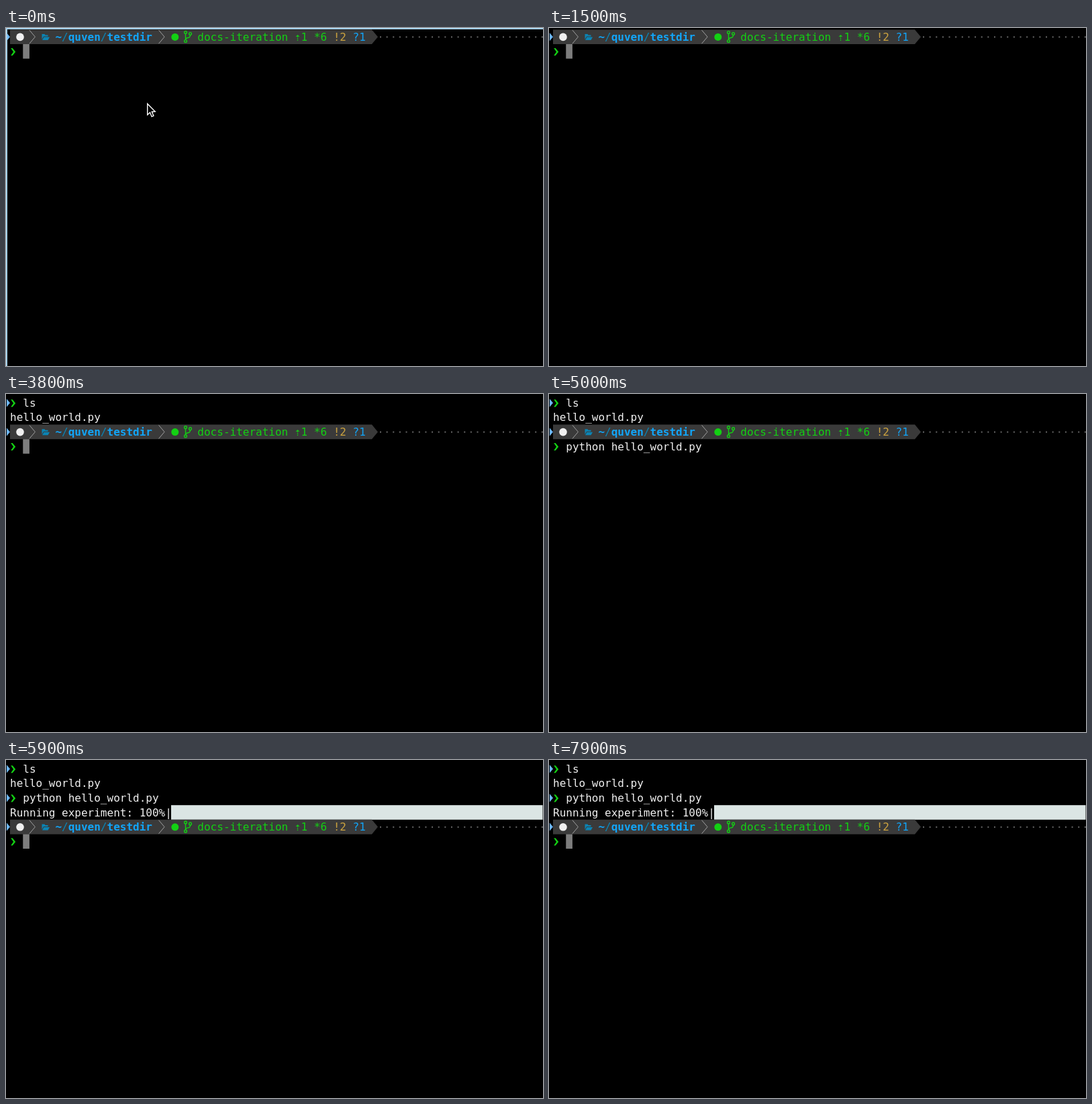
An HTML page with a canvas that plays this animation: 800 px wide and 503 px high, repeating every 8000 ms.

```html
<!DOCTYPE html>
<html lang="en">
<head>
<meta charset="utf-8">
<title>Terminal session</title>
<style>
  html, body { margin: 0; width: 100%; height: 100%; overflow: hidden; background: #000; }
  canvas { display: block; }
</style>
</head>
<body>
<canvas id="stage" width="800" height="503"></canvas>
<script>
const ctx = document.getElementById('stage').getContext('2d');
const LOOP = 8000, CELL = 9.633, LINE = 21.6, LEFT = 6;
const FONT = '16px "DejaVu Sans Mono", monospace';
const GREEN = '#13d013', BLUE = '#12a5f8', DIM_BLUE = '#0b84b4', WHITE = '#f0f0f0';
const FILE = 'hello_world.py';

const colX = col => LEFT + col * CELL;
const rowY = row => 2.4 + row * LINE;

function rect(x, y, w, h, color) {
  ctx.fillStyle = color;
  ctx.fillRect(x, y, w, h);
}

function poly(points, color) {
  ctx.beginPath();
  points.forEach(([x, y]) => ctx.lineTo(x, y));
  ctx.closePath();
  ctx.fillStyle = color;
  ctx.fill();
}

function disc(x, y, r, color) {
  ctx.beginPath();
  ctx.arc(x, y, r, 0, 7);
  ctx.fillStyle = color;
  ctx.fill();
}

function text(str, col, row, color = WHITE, bold = false) {
  ctx.font = (bold ? 'bold ' : '') + FONT;
  ctx.fillStyle = color;
  ctx.fillText(str, colX(col), rowY(row) + 16.4);
}

function cursor(col, row) {
  rect(colX(col), rowY(row), CELL, LINE, '#7d7d7d');
}

function marker(row) {
  const y = rowY(row) + 10.8;
  poly([[1, y - 6], [6, y], [1, y + 6]], '#6cb6f6');
}

function prompt(row, command = '') {
  const y = rowY(row) + 11.4;
  poly([[7.2, y - 5.5], [9.8, y - 5.5], [14.2, y], [9.8, y + 5.5], [7.2, y + 5.5], [11, y]], GREEN);
  text(command, 2, row);
}

function ran(row, command) {
  marker(row);
  prompt(row, command);
}

function folder(x, y) {
  poly([[x, y + 8], [x, y], [x + 4, y], [x + 5, y + 1.5], [x + 9, y + 1.5], [x + 9, y + 3.5],
        [x + 2.5, y + 3.5]], DIM_BLUE);
  poly([[x + 3, y + 4.5], [x + 11.5, y + 4.5], [x + 9, y + 9], [x + 0.5, y + 9]], DIM_BLUE);
}

function branch(x, y) {
  ctx.strokeStyle = GREEN;
  ctx.lineWidth = 1.4;
  ctx.beginPath();
  ctx.moveTo(x, y + 5);
  ctx.lineTo(x, y + 14);
  ctx.moveTo(x + 7, y + 7);
  ctx.quadraticCurveTo(x + 7, y + 10.5, x + 3.5, y + 11);
  ctx.quadraticCurveTo(x, y + 11.5, x, y + 14);
  ctx.stroke();
  for (const [dx, dy] of [[0, 3], [7, 5], [0, 16]]) {
    ctx.beginPath();
    ctx.arc(x + dx, y + dy, 1.9, 0, 7);
    ctx.stroke();
  }
}

function separator(col, row) {
  const x = colX(col), y = rowY(row);
  ctx.strokeStyle = '#a0a0a0';
  ctx.lineWidth = 1;
  ctx.beginPath();
  ctx.moveTo(x, y + 0.8);
  ctx.lineTo(x + 8.5, y + 10.8);
  ctx.lineTo(x, y + 20.8);
  ctx.stroke();
}

// Two-line prompt: the status bar, then the input line
function statusBar(row) {
  const y = rowY(row), end = 545;
  poly([[LEFT, y], [end, y], [end + 9, y + LINE / 2], [end, y + LINE], [LEFT, y + LINE]], '#3a3a3a');
  for (let x = 557; x < 800; x += CELL) rect(x, y + 10.1, 2, 1.8, '#707070');
  marker(row);
  disc(21, y + 11, 5.8, '#f0f0f0');
  separator(3, row);
  folder(53.5, y + 6.6);
  text('~', 7, row, BLUE, true);
  text('/', 8, row, DIM_BLUE);
  text('quven', 9, row, BLUE, true);
  text('/', 14, row, DIM_BLUE);
  text('testdir', 15, row, BLUE, true);
  separator(23, row);
  disc(251.8, y + 11, 5.5, GREEN);
  branch(267.5, y + 1.1);
  text('docs-iteration ⇡1 *6', 29, row, GREEN);
  text('!2', 50, row, '#cba23f');
  text('?1', 53, row, BLUE);
}

function inputPrompt(row, command = '', showCursor = true) {
  statusBar(row);
  prompt(row + 1, command);
  if (showCursor) cursor(2 + command.length, row + 1);
}

// Part of a command typed so far, one letter per key time
const typed = (command, keys, t) => command.slice(0, keys.filter(k => t >= k).length);

function pointer(x, y) {
  ctx.beginPath();
  [[0, 0], [0, 16.5], [3.8, 13], [6.4, 19.2], [9.2, 18], [6.6, 12], [11.5, 11.6]]
    .forEach(([dx, dy]) => ctx.lineTo(x + dx, y + dy));
  ctx.closePath();
  ctx.fillStyle = '#000';
  ctx.fill();
  ctx.strokeStyle = '#fff';
  ctx.lineWidth = 1.4;
  ctx.stroke();
}

function windowGlow(alpha) {
  ctx.globalAlpha = alpha;
  rect(0, 0, 800, 2, '#a6d2ee');
  rect(0, 0, 2, 503, '#a6d2ee');
  ctx.globalAlpha = 1;
}

function draw(t) {
  rect(0, 0, 800, 503, '#000');
  if (t < 2100) {
    inputPrompt(0, typed('ls', [1900, 2000], t));
    if (t < 400) windowGlow(Math.min(1, (400 - t) / 300));
    if (t < 600) pointer(210.7, 112.7);
    return;
  }

  ran(0, 'ls');
  text(FILE, 0, 1);
  const command = 'python ' + FILE;
  if (t < 2300) return cursor(0, 2);
  if (t < 5100) {
    const keys = [3900, 4000, 4200, 4300, 4400, 4500, 4600, 4800];
    return inputPrompt(2, t < 4900 ? typed(command, keys, t) : command, t < 5000);
  }

  ran(2, command);
  if (t < 5700) return cursor(0, 3);
  text('Running experiment: 100%|', 0, 3);
  rect(246, rowY(3), 553.5, LINE, '#dbe5e4');
  if (t < 5800) return cursor(0, 4);
  inputPrompt(4);
}

function tick() {
  draw(performance.now() % LOOP);
  requestAnimationFrame(tick);
}
tick();
</script>
</body>
</html>
```
